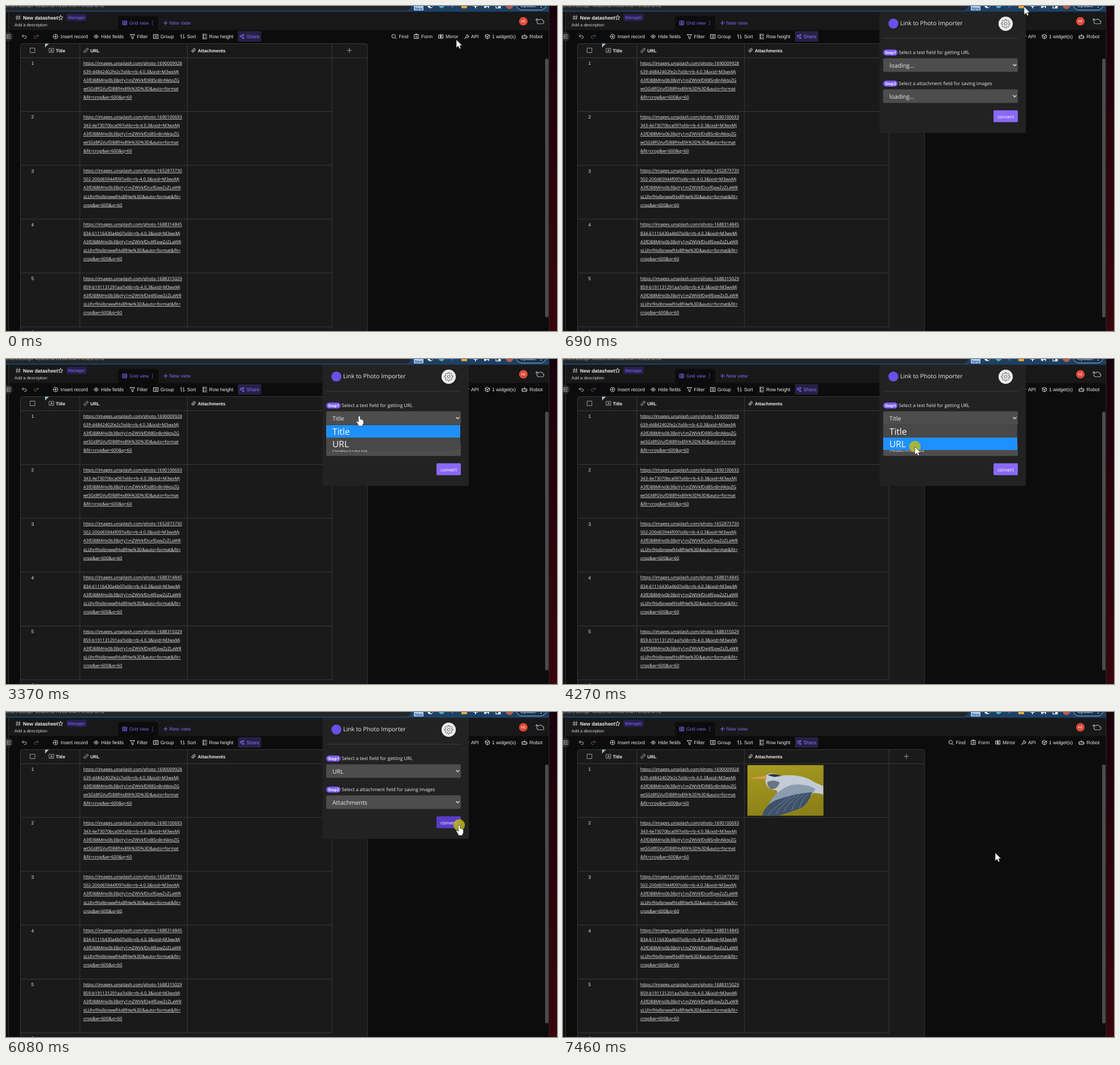
An HTML page for the animation above (8 s loop, 974 by 575 pixels).

```html
<!DOCTYPE html>
<html lang="en">
<head>
<meta charset="utf-8">
<title>Datasheet</title>
<style>
  html, body { margin: 0; width: 100%; height: 100%; overflow: hidden; background: #0c0c0c; }
  svg { display: block; }
  text { font-family: "Liberation Sans", Arial, sans-serif; white-space: pre; text-rendering: geometricPrecision; }
  .hum { font-family: "Open Sans", "Noto Sans", sans-serif; }
  .link { text-decoration: underline; text-decoration-thickness: .9px; text-underline-offset: 2px; }
  .b { font-weight: bold; }
</style>
</head>
<body>
<svg id="stage" width="974" height="575" viewBox="0 0 974 575"></svg>
<script>
const stage = document.getElementById('stage');
const $ = id => document.getElementById(id);
const WHITE = '#ededed', VIOLET = '#7d68f0';

const esc = s => s.replace(/&/g, '&amp;');
const text = (x, y, s, size = 8.6, fill = WHITE, cls = '', more = '') =>
  `<text x="${x}" y="${y}" font-size="${size}" fill="${fill}" class="${cls}" ${more}>${esc(s)}</text>`;
const rect = (x, y, w, h, fill, r = 0, more = '') =>
  `<rect x="${x}" y="${y}" width="${w}" height="${h}" fill="${fill}" rx="${r}" ${more}/>`;
const line = (d, stroke = '#383838', w = 1, more = '') =>
  `<path d="${d}" fill="none" stroke="${stroke}" stroke-width="${w}" ${more}/>`;
const dot = (x, y, r, fill, more = '') => `<circle cx="${x}" cy="${y}" r="${r}" fill="${fill}" ${more}/>`;
// outline icon centred on x, y
const icon = (x, y, d, stroke = WHITE, w = .9) =>
  line(d, stroke, w, `transform="translate(${x} ${y})" stroke-linecap="round" stroke-linejoin="round"`);

const RING = 'M-4 0A4 4 0 1 0 4 0A4 4 0 1 0 -4 0';
const BOX = 'M-3.5 -3.5H3.5V3.5H-3.5Z';
const LINK = 'M-1 1L1.5 -1.5M-.5 -2L1 -3.5A1.8 1.8 0 0 1 3.5 -1L2 .5M.5 2L-1 3.5A1.8 1.8 0 0 1 -3.5 1L-2 -.5';

function browserBar() {
  return rect(0, 0, 960, 10.5, '#1d4064') + rect(-10, -20, 726, 28, '#232629', 9) +
    text(-1, 2.3, 'ench/dstspP4SI2xhdrfNsk/viwPAlfIusAoTd', 9, '#a4a6a8', 'hum') +
    rect(721, -4, 17, 12, '#a9cbf8', 1.5) + text(722.5, 6.6, 'New', 7, '#16324f') +
    dot(750, -1, 5, '#dfe6ec') + rect(750, -3, 4, 5, '#1d4064') +
    `<path d="M765 -4h10v4q-1 3 -5 4q-4 -1 -5 -4z" fill="#46b0b5"/>` +
    dot(789, 1.5, 1, '#5aa5e8') +
    rect(805, -4, 10, 8, '#e9a63a', 1) +
    rect(826, -4, 8, 5, '#d7e3ee') + rect(829, 0, 2, 4, '#d7e3ee') +
    rect(845, -3, 9, 6.5, '#d7e3ee', 1) + rect(849, 1.5, 3, 2.5, '#1d4064') +
    line('M866 -3V3.5H874V-3', '#d7e3ee', 1.3) + rect(870, -3, 4, 6, '#d7e3ee') +
    dot(890, -1, 6.5, '#b85a48') +
    rect(902, -13, 53, 20, '#17324f', 10, 'stroke="#a8c4e2" stroke-width=".9"') +
    text(909, 2, 'Update', 8.8, '#cfe2f7') + dot(946, 2, .9, '#cfe2f7') + dot(946, -1, .9, '#cfe2f7');
}

function header() {
  return rect(0, 10.5, 960, 32, '#181818') + rect(198, 17.5, 71, 26, '#0c0c0c', 4) +
    icon(21.5, 20.5, 'M-1.5 -4L-2.5 4M2.5 -4L1.5 4M-4 -1.5H4M-4 1.5H4', '#bbb') +
    text(30, 23.6, 'New datasheet', 8.85, WHITE, 'b') +
    icon(96.5, 20.5, 'M0 -4L1.2 -1.2L4 -1L1.8 .9L2.5 3.7L0 2.2L-2.5 3.7L-1.8 .9L-4 -1L-1.2 -1.2Z') +
    rect(107, 14, 35.5, 12.5, '#282150', 1.5) + text(109.5, 23, 'Manager', 7.6, VIOLET) +
    text(15, 36.4, 'Add a description', 7.5, '#d0d0d0') +
    icon(210, 30, 'M-3.5 -3.5H3.5V3.5H-3.5ZM-3.5 -1H3.5M-3.5 1.3H3.5M0 -3.5V3.5', VIOLET) +
    text(218, 33, 'Grid view', 8.3, VIOLET) +
    [27, 30, 33].map(y => dot(259, y, .8, VIOLET)).join('') +
    icon(282, 30, 'M-3.5 0H3.5M0 -3.5V3.5', VIOLET, 1.1) + text(288.5, 33, 'New view', 8.9, VIOLET) +
    dot(914.5, 27, 7.6, '#dc4a38') + text(914.5, 29.2, 'KE', 6, '#fff', '', 'text-anchor="middle"') +
    icon(943.5, 27, 'M-7 -2.5L-5 -4.5L-3 -2.5M-5 -4V1A3.5 3.5 0 0 0 -2 4.5H4.5A3 3 0 0 0 5 -1.4A4 4 0 0 0 -2 -2', '#98a6ad', 1.2);
}

function toolbar() {
  const tools = [
    [87.5, 96.5, 'Insert record', RING + 'M-2 0H2M0 -2V2'],
    [159.5, 168, 'Hide fields', 'M-4 0Q0 -6 4 0Q0 6 -4 0M-1.2 0A1.2 1.2 0 1 0 1.2 0A1.2 1.2 0 1 0 -1.2 0'],
    [223.5, 231.5, 'Filter', 'M-4 -3.5H4L1.2 0V4L-1.2 3V0Z'],
    [265, 273, 'Group', 'M-4 -3.5H4V3.5H-4ZM-2 -1.2H2M-2 1.2H2'],
    [312, 320, 'Sort', 'M-2 3.5V-3.5L-4 -1.5M2 -3.5V3.5L4 1.5'],
    [351, 359, 'Row height', 'M-3.5 -4H4M-3.5 4H4M-2 -2.5V2.5M-3.5 -1.2L-2 -2.7L-.5 -1.2M-3.5 1.2L-2 2.7L-.5 1.2M1.5 -1.5H4M1.5 1.5H4'],
    [686, 694.5, 'Find', 'M-4 -.5A3.2 3.2 0 1 0 2.4 -.5A3.2 3.2 0 1 0 -4 -.5M1.7 1.8L4 4'],
    [725.5, 734, 'Form', BOX + 'M-1.5 -4.3H1.5M-1.5 -1H1.5M-1.5 1.3H1.5'],
    [768.5, 777, 'Mirror', 'M0 -4V4M-1.7 -2.8H-4V2.8H-1.7ZM1.7 -2.8L4 -3.5V3.5L1.7 2.8Z'],
    [814.5, 822, 'API', 'M-4 4L-2 1.5M-2 1.5L0 -3L3.5 1L-1 2.5ZM1.5 -3.5L0 -3M4 -1L2.5 -.5'],
    [851, 859, '1 widget(s)', 'M0 -4L3.7 -2V2L0 4L-3.7 2V-2ZM-3.7 -2L0 0L3.7 -2M0 0V4'],
    [916.5, 925.5, 'Robot', 'M-3.5 -1.5H3.5V3.5H-3.5ZM0 -1.5V-4M-1.3 .5V1.5M1.3 .5V1.5M-4.5 0V2M4.5 0V2']
  ];
  return rect(410, 44.5, 41, 18.5, '#272146', 2) +
    icon(417, 54, 'M-3 -2.5H-1M-3 0A1.3 1.3 0 1 0 -.4 0A1.3 1.3 0 1 0 -3 0M-.5 -.6L2 -2.5M-.5 .6L2 2.5M1.5 -3.5H3.5V-1.5H1.5ZM1.5 1.5H3.5V3.5H1.5Z', '#8a6ff8') +
    text(425, 57, 'Share', 8.6, '#8a6ff8') +
    icon(32.5, 54, 'M-1.5 -3.5L-4 -1L-1.5 1.5M-4 -1H1.5A2 2 0 0 1 1.5 3.3H0', '#ccc') +
    icon(53.5, 54, 'M1.5 -3.5L4 -1L1.5 1.5M4 -1H-1.5A2 2 0 0 0 -1.5 3.3H0', '#666') +
    tools.map(([ix, tx, s, d]) => icon(ix, 54, d) + text(tx, 57, s)).join('');
}

function table() {
  const head = 'https://images.unsplash.com/photo-', mid = '?ixlib=rb-4.0.3&ixid=M3wxMj', hash = 'A3fDB8MHx0b3BpYy1mZWVk';
  const tailA = ['wtSGt8fGVufDB8fHx8fA%3D%3D&auto=format', '&fit=crop&w=600&q=60'];
  const tailB = ['sLUhrfHxlbnwwfHx8fHw%3D&auto=format&fit=', 'crop&w=600&q=60'];
  const rows = [
    ['1690009928', '639-d4842402fe2c', 'fDR8SnBnNktpZG', tailA],
    ['1690100693', '343-4e73070bca09', 'fDd8SnBnNktpZG', tailA],
    ['1652873730', '502-200d65944f09', 'fDcxfEpwZzZLaWR', tailB],
    ['1688314845', '834-61116430a4b0', 'fDc4fEpwZzZLaWR', tailB],
    ['1688315029', '859-b191131291aa', 'fDg4fEpwZzZLaWR', tailB]
  ];
  let out = rect(25.5, 66.5, 613.5, 530, '#1a1a1a', 4, 'stroke="#383838"') +
    line('M26 91.5H639M130.5 67V568M320.5 67V568M576.5 67V568') +
    `<path d="M69 66.5H76L69 73.5Z" fill="#a9b8c2"/>` +
    icon(47, 78.5, 'M-4 -4H4V4H-4Z', '#aaa') +
    icon(80.5, 78.5, 'M-4 -3.5H4V3.5H-4ZM-1.7 2L0 -2L1.7 2M-1 .7H1', '#bbb', .8) + text(88, 81.5, 'Title', 8.2, WHITE, 'b') +
    icon(141.5, 78.5, LINK, '#ccc') + text(149, 81.5, 'URL', 8, WHITE, 'b') +
    icon(331.5, 78.5, 'M3.5 -.5L0 3A2.2 2.2 0 0 1 -3 0L.5 -3.4A1.5 1.5 0 0 1 2.6 -1.3L-.5 1.7A.7 .7 0 0 1 -1.5 .7L1 -1.7', '#ccc') +
    text(339, 81.5, 'Attachments', 8.1, WHITE, 'b') +
    icon(607, 78.5, 'M-4 0H4M0 -4V4', '#999', 1);
  rows.forEach(([id, key, code, tail], i) => {
    const y = 95.25 * i;
    out += line(`M26 ${186.6 + y}H576`) + text(44.7, 104 + y, `${i + 1}`, 8.2);
    [head + id, key + mid, hash + code, ...tail].forEach((s, k) =>
      out += text(136.7, 103.7 + y + 15.1 * k, s, 7.7, '#f0f0f0', 'hum link'));
  });
  return out + text(44.7, 579.5, '6', 8.2);
}

function sides() {
  return rect(0, 10.5, 4.5, 565, '#111') + line('M4.5 10.5V575', '#333') +
    dot(4, 54, 8, '#2a2a2a') + icon(5, 54, 'M-4 -3H3M-1 0H3M-4 3H3M-2 -1.3L-4 0L-2 1.3', '#ccc') +
    rect(953, 93, 6, 458, '#4b4b4b', 3) +
    rect(960, 0, 14, 575, 'url(#wine)') + line('M960 0V575', '#2d2d2d');
}

function photo() {
  const feathers = [0, 1, 2, 3, 4].map(i =>
    line(`M${362 + 14 * i} ${183 - 3 * i}Q${378 + 11 * i} ${164 - 3 * i} ${402 + 8 * i} ${149 - i}`, '#73869c', 1)).join('');
  return `<g id="photo" clip-path="url(#frame)">` + rect(326, 94, 135, 90, 'url(#olive)') +
    `<path d="M358 113Q368 104 384 113Q420 108 444 124L460 131V146Q446 142 438 144L372 156Q383 140 376 138Q362 139 358 124Z" fill="#c3ccd4"/>
    <path d="M362 166Q376 138 404 129Q430 126 446 136Q440 152 420 158L362 172Z" fill="#8c9cb0"/>
    <path d="M352 184Q356 166 376 156Q410 144 440 142Q434 162 421 170L404 176L386 182L378 184Z" fill="#3f5169"/>${feathers}
    <path d="M329 117L359 113L360 119Z" fill="#d99a55"/>
    <path d="M362 112Q370 107 386 113L374 115Z" fill="#2c3442"/>
    <path d="M361 124Q372 118 383 125Q379 137 368 137Q361 132 361 124Z" fill="#68747f"/></g>`;
}

function popup() {
  const select = (y, id) => rect(566, y, 238, 24, '#4d4d4d', 2) +
    text(577, y + 16, '', 10.4, WHITE, 'hum', `id="${id}"`) +
    icon(798.5, y + 12, 'M-2.6 -1.3L0 1.3L2.6 -1.3', '#fff', 1.2);
  const step = (n, y, s) => rect(566, y, 25.5, 10.5, '#7d5cf5', 5.2) +
    text(569.2, y + 7.8, 'Step' + n, 7, '#fff', 'hum b') + text(593.5, y + 8, s, 8.3, WHITE, 'hum');
  const teeth = [...Array(8)].map((_, i) => {
    const a = i * Math.PI / 4, p = (r, d) => `${(r * Math.cos(a + d)).toFixed(2)} ${(r * Math.sin(a + d)).toFixed(2)}`;
    return `${i ? 'L' : 'M'}${p(5.6, -.25)}L${p(7.6, -.17)}L${p(7.6, .17)}L${p(5.6, .25)}`;
  }).join('') + 'Z';
  return `<g id="popup">` + rect(559.5, 10, 258.5, 214.5, '#222') +
    dot(584, 31, 8.8, '#6a50e8') + text(596, 34.3, 'Link to Photo Importer', 10.45, WHITE, 'hum') +
    dot(782.5, 31.3, 12.6, '#ececec') + icon(782.5, 31.3, teeth + 'M-2.5 0A2.5 2.5 0 1 0 2.5 0A2.5 2.5 0 1 0 -2.5 0', '#555', .9) +
    line('M566 57H804', '#3c3c3c') +
    step(1, 77, 'Select a text field for getting URL') + select(92.5, 'source') +
    step(2, 132, 'Select a attachment field for saving images') + select(147.5, 'target') +
    rect(0, 184.5, 0, 21, '', 1.5, 'id="button"') + rect(741.5, 184.5, 62.5, 21, 'url(#stripes)', 1.5, 'id="busy"') +
    text(782.5, 198.7, '', 8.3, '#fff', 'hum', 'id="caption" text-anchor="middle"') +
    `<g id="menu">` + rect(566, 116.5, 237, 45, '#484848') + rect(566, 117, 237, 22, '#1e90ff', 0, 'id="choice"') +
    text(577, 133.8, 'Title', 15.6, '#fff', 'hum') + text(577, 155.8, 'URL', 15.6, '#fff', 'hum') + '</g></g>';
}

stage.innerHTML = `<defs>
  <linearGradient id="wine" x2="0" y2="1"><stop stop-color="#17030c"/><stop offset=".5" stop-color="#2c040d"/><stop offset="1" stop-color="#38060d"/></linearGradient>
  <linearGradient id="olive" x2=".3" y2="1"><stop stop-color="#a99c22"/><stop offset="1" stop-color="#8b8118"/></linearGradient>
  <clipPath id="frame"><rect x="326" y="94" width="134.5" height="89.5"/></clipPath>
  <pattern id="stripes" width="5" height="5" patternUnits="userSpaceOnUse" patternTransform="rotate(-45)">
    <rect width="5" height="5" fill="#5b41b4"/><rect width="5" height="2.5" fill="#4a3590"/></pattern></defs>` +
  rect(0, 0, 974, 575, '#0c0c0c') + browserBar() + header() + toolbar() + table() + sides() + photo() + popup() +
  dot(0, 0, 10.2, '#c4be12', 'id="click" opacity=".8"') +
  `<g stroke="#222" stroke-width=".7" stroke-linejoin="round" fill="#fff">
    <path id="arrow" d="M0 0V14.5L3.4 11.4L5.6 16.2L8 15.1L5.9 10.5H10.4Z"/>
    <path id="hand" d="M-1.7 1.3Q0 -.9 1.7 1.3V6Q3.2 5.2 4 6.6Q5.4 6 6 7.5Q7.4 7.2 7.6 8.8V12.5Q7.4 15 6 16V18.3H-1.6V16.4L-5.2 10.8Q-5.4 8.6 -3.4 9.4L-1.7 11.2Z"/></g>`;

// [start, x, y, hand]
const moves = [[0, 796, 59.5], [70, 798, 45], [148, 805, 22], [225, 812, 6], [303, 815, 1],
  [1690, 735, 45], [1770, 624.5, 100.5, 1], [3970, 622, 155], [4870, 622, 155, 1],
  [5100, 730, 188], [5180, 798, 206], [5480, 801, 204, 1], [5780, 801, 200, 1], [6920, 764, 249]];
const clicks = [[380, 690], [2770, 3370], [4270, 4870], [5780, 6380], [7070, 7400]];
const fades = [[0, 0], [535, .35], [613, .75], [690, 1], [7160, .75], [7240, .45], [7320, .15], [7400, 0]];

const at = (list, t) => list.findLast(k => k[0] <= t);
const show = (id, on) => $(id).setAttribute('visibility', on ? 'inherit' : 'hidden');
const set = (id, attrs) => { for (const k in attrs) $(id).setAttribute(k, attrs[k]); };

function draw(t) {
  const [, x, y, hand] = at(moves, t), place = `translate(${x} ${y})`;
  set('arrow', { transform: place });
  set('hand', { transform: place });
  set('click', { transform: place });
  show('hand', hand);
  show('arrow', !hand);
  show('click', clicks.some(([a, b]) => t >= a && t < b));

  const alpha = at(fades, t)[1];
  set('popup', { opacity: alpha, transform: `translate(0 ${-8 * (1 - alpha)})` });
  $('source').textContent = t < 1690 ? 'loading...' : t < 4870 ? 'Title' : 'URL';
  $('target').textContent = t < 1690 ? 'loading...' : 'Attachments';
  show('menu', t >= 3070 && t < 4870);
  set('choice', { y: t < 3970 ? 117 : 139 });

  const busy = t >= 6380;
  set('button', { x: busy ? 741.5 : 761, width: busy ? 62.5 : 43, fill: t < 5480 ? '#8a69f8' : t < 6080 ? '#7654e8' : '#5a3cc8' });
  show('busy', busy);
  set('stripes', { patternTransform: `rotate(-45) translate(0 ${t < 6680 ? 0 : 2.5})` });
  $('caption').textContent = busy ? 'Converting...' : 'convert';
  set('caption', { x: busy ? 772.7 : 782.5, fill: busy ? '#a19bb5' : '#fff' });
  show('photo', t >= 7460);
}

function tick(now) {
  draw(now % 8000);
  requestAnimationFrame(tick);
}
draw(0);
requestAnimationFrame(tick);
</script>
</body>
</html>
```
